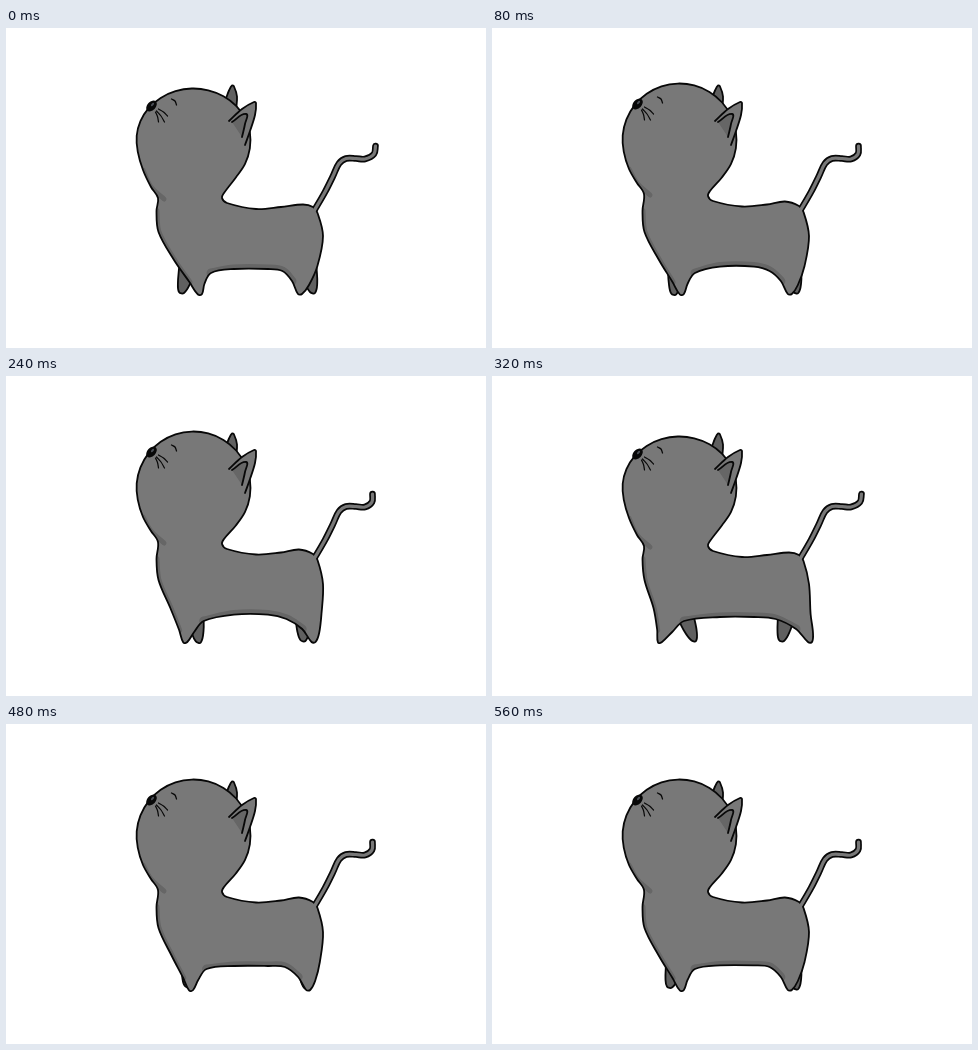
Recreate the animation shown at these times as an HTML page with a canvas. Size 480 by 320 pixels, loop 0.64 s.

```html
<!DOCTYPE html>
<html lang="en">
<head>
<meta charset="utf-8">
<title>Walking cat</title>
<style>
html, body { margin: 0; width: 100%; height: 100%; overflow: hidden; background: #fff; }
canvas { display: block; }
</style>
</head>
<body>
<canvas id="stage" width="480" height="320"></canvas>
<script>
const ctx = document.getElementById('stage').getContext('2d');
const STEP = 80, STEPS = 8;
const FUR = '#787878', SHADE = '#666', FAR = '#606060', INK = '#080808';

const shift = (points, [dx, dy]) => points.map(([x, y]) => [x + dx, y + dy]);

// Smooth curve through points; handles scale with each span so tips stay tight
function curve(points, closed) {
  const n = points.length, path = new Path2D();
  const at = i => points[closed ? (i + n) % n : Math.max(0, Math.min(n - 1, i))];
  const heading = i => {
    const a = at(i - 1), b = at(i + 1), len = Math.hypot(b[0] - a[0], b[1] - a[1]) || 1;
    return [(b[0] - a[0]) / len, (b[1] - a[1]) / len];
  };
  path.moveTo(...points[0]);
  for (let i = 0; i < n - (closed ? 0 : 1); i++) {
    const p = at(i), q = at(i + 1), u = heading(i), v = heading(i + 1);
    const h = Math.hypot(q[0] - p[0], q[1] - p[1]) / 3;
    path.bezierCurveTo(p[0] + u[0] * h, p[1] + u[1] * h, q[0] - v[0] * h, q[1] - v[1] * h, q[0], q[1]);
  }
  if (closed) path.closePath();
  return path;
}

function stroke(path, width = 1.8, color = INK) {
  ctx.lineWidth = width;
  ctx.strokeStyle = color;
  ctx.stroke(path);
}

function shape(path, color) {
  ctx.fillStyle = color;
  ctx.fill(path);
  stroke(path);
}

function blob(x, y, rx, ry, color) {
  ctx.fillStyle = color;
  ctx.beginPath();
  ctx.ellipse(x, y, rx, ry, -0.8, 0, 7);
  ctx.fill();
}

// The feet snap to full stretch in mid-cycle and drift back; the cat dips at both ends of the stride
function gait(step) {
  const phase = step / STEPS * 2 * Math.PI;
  const closed = Math.abs(2 * step / STEPS - 1) ** 0.6;
  const sway = Math.sin(phase);
  return {
    sway,
    dip: Math.max(0, Math.cos(2 * phase)),
    front: 168 + 26 * closed,
    hind: 318 - 24 * closed,
    farFront: 202 - 26 * closed + 3 * sway,
    farHind: 290 + 17 * closed
  };
}

function headArc(dip) {
  const points = [], count = 14;
  for (let i = 0; i <= count; i++) {
    const angle = (168 + 234 * i / count) * Math.PI / 180, y = Math.sin(angle);
    points.push([187.5 + 57 * Math.cos(angle), 112 + y * (y < 0 ? 56.5 - 5 * dip : 56)]);
  }
  return points;
}

const backLine = dip => [
  [218, 163 + 2 * dip], [216, 168 + 2 * dip], [221, 173 + 2 * dip], [250, 178.5 + 2.5 * dip],
  [275, 176.5 + 2.5 * dip], [293 + 4 * dip, 173.5 + 3 * dip], [307, 178 + dip], [311.5, 184 + dip]
];

function hindLeg(foot) {
  const lean = foot - 306;
  return [[317, 208], [315 + 0.3 * lean, 238], [foot + 6 - 0.25 * lean, 257], [foot + 2, 266],
    [foot - 2, 266], [foot - 11 - 0.25 * lean, 253], [280 + 0.3 * lean, 243]];
}

function frontLeg(foot) {
  const lean = foot - 182;
  return [[199 + 0.5 * lean, 245], [190 + 0.7 * lean, 256], [foot + 2, 266], [foot - 2, 266.5],
    [175 + 0.7 * lean, 254], [165 + 0.25 * lean, 232], [152.5, 204], [150.5, 183]];
}

function farLeg(foot, rest, ground) {
  const hip = rest + 0.45 * (foot - rest), shin = 0.6 * foot + 0.4 * hip;
  return curve([[hip - 9, 240], [shin - 6.5, 255], [foot - 3, ground - 1], [foot + 2, ground],
    [shin + 6, 255], [hip + 8, 240]]);
}

function drawFace(nose) {
  blob(...nose, 6.3, 4.2, INK);
  blob(nose[0] + 1, nose[1] - 1.5, 2, 1, '#4b5058');
  const whiskers = [[4, 6, 7, 16], [5, 5, 13, 16], [7, 3, 16, 10]];
  for (const [x, y, endX, endY] of whiskers) {
    stroke(curve(shift([[x, y], [(x + endX) / 2 + 0.5, (y + endY) / 2 - 0.5], [endX, endY]], nose)), 1.2);
  }
  stroke(curve(shift([[20, -7], [23.5, -5], [25, -1]], nose)), 1.3);
}

function drawEar(tip) {
  shape(curve(shift([[-27, 19], [-14, 7], [-2, 0], [0, 1], [-1, 13], [-6, 29], [-11, 43]], tip)), FUR);
  shape(curve(shift([[-24, 20], [-10, 12], [-11, 22], [-14, 35]], tip)), SHADE);
}

function draw(step) {
  const { dip, sway, front, hind, farFront, farHind } = gait(step);
  const chin = 166 + 4 * dip;
  const throat = [[152, chin], [145, chin - 11], [137, 141 + dip]];
  const chest = frontLeg(front), rump = hindLeg(hind);
  const bellyY = 240 - 2 * sway + dip;
  const belly = [[262, bellyY], [228, bellyY]];
  const outline = curve([...headArc(dip), ...backLine(dip), ...rump, ...belly, ...chest, ...throat], true);
  const tail = curve([[308, 183], [319, 164], [327, 148], [333, 135.5], [340, 130.5], [350, 130.5],
    [359, 131], [366 + 2 * dip, 126], [366.5 + 3 * dip, 118]]);

  ctx.fillStyle = '#fff';
  ctx.fillRect(0, 0, 480, 320);
  ctx.lineCap = ctx.lineJoin = 'round';

  shape(curve(shift([[-7, 13], [-4, 5], [-1, 0], [1, 1], [4, 11], [3, 25]], [227, 57.5])), FAR);
  shape(farLeg(farFront, 187, 265 + 2 * sway), FAR);
  shape(farLeg(farHind, 299, 265), FAR);
  stroke(tail, 6.6);

  ctx.fillStyle = FUR;
  ctx.fill(outline);
  ctx.save();
  ctx.clip(outline);
  stroke(curve([...rump.slice(-2), ...belly, chest[0]]), 9, SHADE);
  stroke(curve(chest.slice(4)), 6, SHADE);
  stroke(curve([[158, chin + 1], ...throat.slice(1)]), 5, SHADE);
  ctx.restore();
  stroke(outline);
  stroke(tail, 3.2, FUR);

  drawEar([250, 74]);
  drawFace([145.5, 76 + 2 * dip]);
}

function tick() {
  draw(Math.floor(performance.now() / STEP) % STEPS);
  requestAnimationFrame(tick);
}
tick();
</script>
</body>
</html>
```
